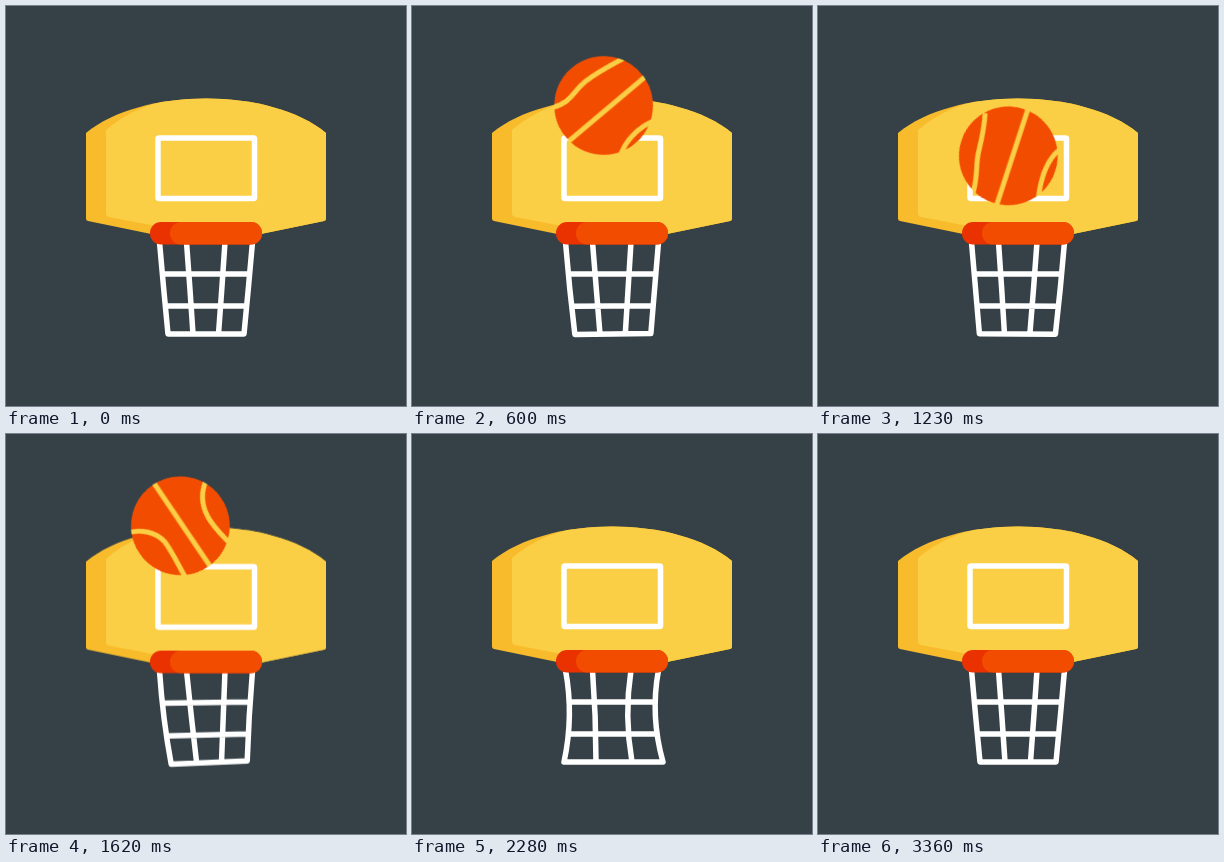
Recreate the animation shown at these times as an HTML page without scripts. Size 400 by 400 pixels, loop 5.39 s.

```html
<!DOCTYPE html>
<html lang="en">
<head>
<meta charset="utf-8">
<title>Basketball hoop</title>
<style>
  :root {
    --loop: 5.39s;
    --rise: cubic-bezier(.333, .667, .667, 1);
    --fall: cubic-bezier(.333, 0, .667, .333);
    --settle: cubic-bezier(.3, 0, .4, 1.5);

    /* net poses: outline, two inner cords, two rows */
    --rest: path("M153.5 236Q157.5 282 162 328L238 328Q242.5 282 246.5 236M180.5 236Q184 282 187 328M219 236Q216 282 212.5 328M157 268L243 268M160 300L240 300");
    --right: path("M153.5 236Q156 290 170 331.5L246 323.5Q243 280 246.5 236M180.5 236Q187 282 196 328M219 236Q219 282 220 326M158 269L245 266M163 303L244 298");
    --left: path("M153.5 236Q157 280 154 323.5L230 331.5Q244 290 246.5 236M180.5 236Q181 282 180 326M219 236Q213 282 204 328M155 266L242 269M156 298L237 303");
    --wide: path("M153.5 236Q162 282 152 328L251 328Q238 282 246.5 236M180.5 236Q184 282 184 328M219 236Q212 282 220 328M157 268L243 268M157 300L243 300");

    /* ball seams: left curve, straight seam, right curve */
    --front: path("M-32 -44C-22 -33 -17 -20 -18.5 -7C-20 6 -28 20 -44 31M2 -52L2 52M39 -41C19 -22 19 8 50 29");
    --side: path("M-13 -50C-30 -32 -43 -18 -43 3C-43 24 -17 24 -17 50M8 -52L8 52M62 -40C58 -20 58 10 64 30");
    --back: path("M-48 -24C-34 -19 -24 -9 -22 4C-21 16 -24 32 -25 50M2 -52L2 52M48 -24C22 -8 26 18 32 46");
    --even: path("M-40 -37C-28 -24 -23 -12 -23 0C-23 12 -28 24 -40 36M1 -52L1 52M38 -35C20 -16 22 14 43 36");
  }
  html, body { margin: 0; width: 100%; height: 100%; overflow: hidden; background: #364147; }
  svg { display: block; width: 100%; height: 100%; }

  .line { fill: none; stroke: #fff; stroke-width: 5.5; stroke-linecap: round; stroke-linejoin: round; }
  .light { fill: #fbcf45; }
  .dark { fill: #f8bb2b; }
  .orange { fill: #f24c00; }
  .red { fill: #e93200; }

  .hoop { animation: jolt var(--loop) linear infinite; }
  .net { d: var(--rest); animation: swing var(--loop) ease-in-out infinite; }
  .across { animation: across var(--loop) linear infinite; }
  .bounce { animation: bounce var(--loop) linear infinite; }
  .spin { animation: spin var(--loop) linear infinite; }
  .seams {
    d: var(--front); fill: none; stroke: #fbcf45; stroke-width: 5;
    animation: roll var(--loop) linear infinite;
  }

  @keyframes jolt {
    0%, 4.88%, 9%, 17.66%, 21%, 25.79%, 31%, 100% { transform: translateY(0); }
    5.6%, 18.4% { transform: translateY(4px); }
    6.68% { transform: translateY(2.6px); }
    26.6% { transform: translateY(3px); }
  }
  @keyframes swing {
    0%, 4.88%, 14%, 17.66%, 24.5%, 25.79%, 34%, 38.8%, 46.8%, 62.34%, 100% { d: var(--rest); }
    6.68%, 28%, 51.2% { d: var(--right); animation-timing-function: var(--settle); }
    19.5% { d: var(--left); animation-timing-function: var(--settle); }
    42.3%, 43.5% { d: var(--wide); }
  }
  @keyframes across {
    0%, .56% { transform: translateX(134px); }
    4.88% { transform: translateX(145px); }
    17.66% { transform: translateX(240px); }
    25.79% { transform: translateX(162px); }
    38.9% { transform: translateX(200px); }
    42.3%, 100% { transform: translateX(201px); }
  }
  @keyframes bounce {
    0% { transform: translateY(-52px); }
    .56% { transform: translateY(-52px); animation-timing-function: cubic-bezier(.33, .2, .67, .6); }
    4.88% { transform: translateY(166px); animation-timing-function: var(--rise); }
    11.3% { transform: translateY(99.5px); animation-timing-function: var(--fall); }
    17.66% { transform: translateY(166px); animation-timing-function: var(--rise); }
    21.72% { transform: translateY(136px); animation-timing-function: var(--fall); }
    25.79% { transform: translateY(166px); animation-timing-function: var(--rise); }
    31.71% { transform: translateY(88px); animation-timing-function: var(--fall); }
    44.53%, 100% { transform: translateY(458px); }
  }
  @keyframes spin {
    0%, .56% { transform: rotate(-40deg); }
    4.88% { transform: rotate(-10deg); }
    17.66% { transform: rotate(112deg); }
    25.79% { transform: rotate(-35.5deg); }
    42.3%, 100% { transform: rotate(-30deg); }
  }
  @keyframes roll {
    0%, 6.68% { d: var(--front); }
    16.14%, 17.66% { d: var(--side); }
    25.79%, 30.06% { d: var(--back); }
    42.3%, 100% { d: var(--even); }
  }
</style>
</head>
<body>
<svg viewBox="0 0 400 400">
  <defs>
    <clipPath id="board"><path d="M80 127C135 81 265 81 320 127V212.500Q320 214.500 318 215L250 229H150L82 215Q80 214.500 80 212.500Z"/></clipPath>
    <clipPath id="round"><circle r="49.5"/></clipPath>
  </defs>

  <g class="hoop">
    <g clip-path="url(#board)">
      <path class="dark" d="M70 80H330V240H70Z"/>
      <path class="light" d="M100 124Q130 98 175 92V80H330V240H150V220L103 211Q100 210 100 207Z"/>
    </g>
    <rect class="line" x="152" y="132" width="96.500" height="60.500" rx="1"/>
  </g>

  <g class="across"><g class="bounce"><g class="spin" clip-path="url(#round)">
    <circle class="orange" r="49.5"/>
    <path class="seams"/>
  </g></g></g>

  <g class="hoop">
    <path class="line net"/>
    <rect class="red" x="144" y="216" width="112" height="22.500" rx="11"/>
    <rect class="orange" x="164" y="216" width="92" height="22.500" rx="11"/>
  </g>
</svg>
</body>
</html>
```
